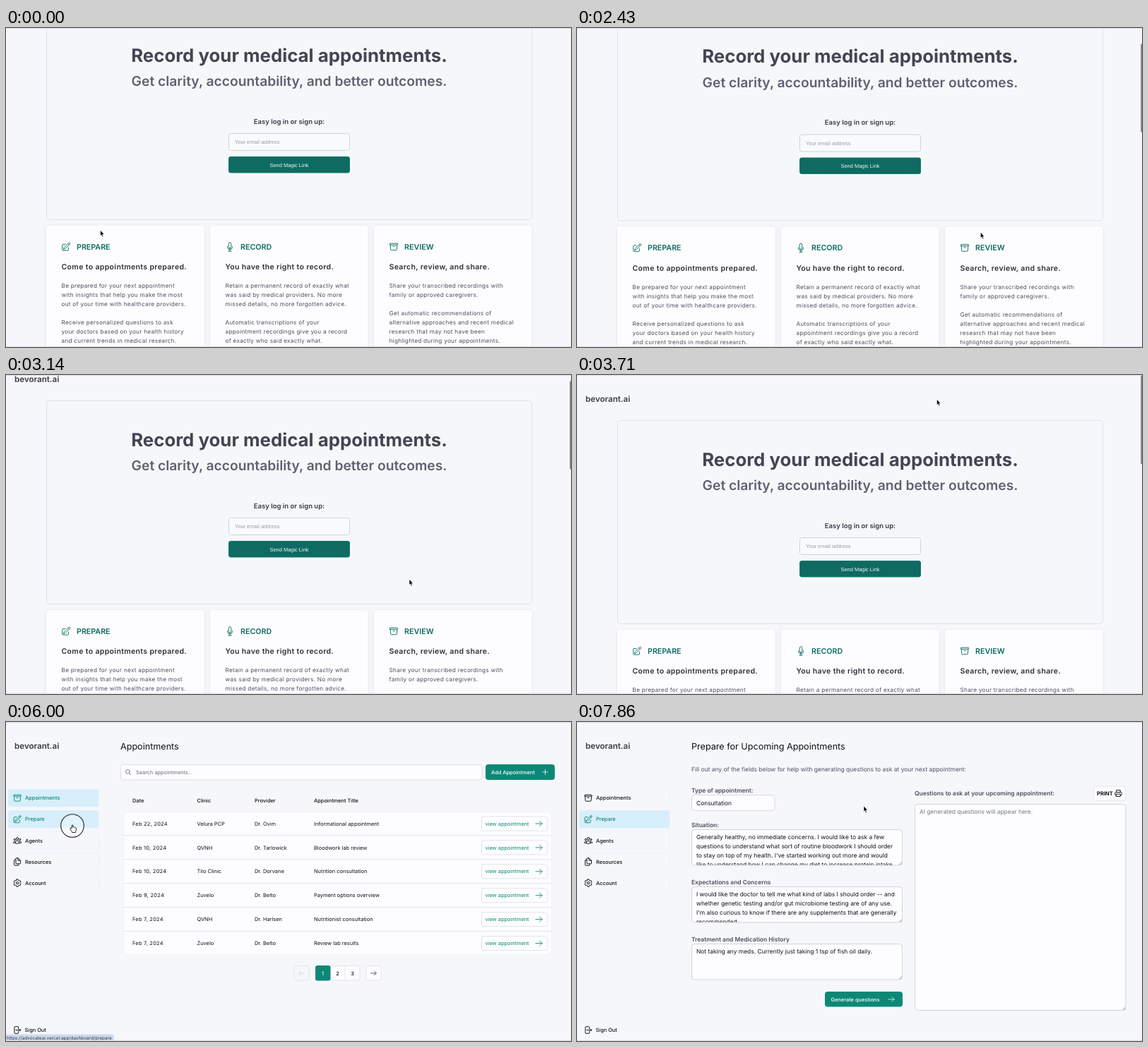
Write an HTML page that moves like this. It is 800 px wide and 452 px high and loops after 8000 ms.

```html
<!DOCTYPE html>
<html lang="en">
<head>
<meta charset="utf-8">
<title>Appointments demo</title>
<style>
  html, body { margin: 0; width: 100%; height: 100%; overflow: hidden; background: #f6f7fb; }
  svg { display: block; }
  text { font-family: Inter, "Open Sans", sans-serif; white-space: pre; text-rendering: geometricPrecision; }
  .arial { font-family: "Liberation Sans", Arial, sans-serif; }
  .icon { fill: none; stroke-linecap: round; stroke-linejoin: round; }
  .card { filter: drop-shadow(0 1px 2px rgba(40, 50, 80, .1)); }
</style>
</head>
<body>
<svg id="stage" width="100%" height="100%" viewBox="0 0 800 452"></svg>
<script>
const LOOP = 8000, STEP = 1000 / 7;
const INK = '#0f1115', SLATE = '#4a505e', GRAY = '#737986', TEAL = '#0d8877', DEEP = '#0f6a62', LINE = '#dfe2ea', WHITE = '#fdfdff';
const BRAND = 'bevorant.ai';

const ICONS = {
  pencil: 'M16.9 4.5l1.6-1.7a1.9 1.9 0 0 1 2.7 2.7L10.6 16.1a4.5 4.5 0 0 1-1.9 1.1L6 18l.8-2.7a4.5 4.5 0 0 1 1.1-1.9zM16.9 4.5l2.6 2.6M18 14v4.8A2.2 2.2 0 0 1 15.8 21H5.2A2.2 2.2 0 0 1 3 18.8V8.2A2.2 2.2 0 0 1 5.2 6H10',
  mic: 'M12 18.8a6 6 0 0 0 6-6v-1.5M12 18.8a6 6 0 0 1-6-6v-1.5M12 18.8v3.7M8.2 22.5h7.6M12 15.8a3 3 0 0 1-3-3V4.5a3 3 0 0 1 6 0v8.3a3 3 0 0 1-3 3z',
  archive: 'M20.3 7.5l-.7 10.6a2.2 2.2 0 0 1-2.2 2.2H6.6a2.2 2.2 0 0 1-2.2-2.2L3.8 7.5M10 11.3h4M3.4 7.5h17.2c.6 0 1.1-.5 1.1-1.1V4.9c0-.6-.5-1.1-1.1-1.1H3.4c-.6 0-1.1.5-1.1 1.1v1.5c0 .6.5 1.1 1.1 1.1z',
  people: 'M15 7a3 3 0 1 1-6 0a3 3 0 1 1 6 0M21 9.5a2.2 2.2 0 1 1-4.4 0a2.2 2.2 0 1 1 4.4 0M7.4 9.5a2.2 2.2 0 1 1-4.4 0a2.2 2.2 0 1 1 4.4 0M6 18.7a6 6 0 0 1 12 0a12 12 0 0 1-12 0zM18 18.7c1.7.2 3.2-.1 4.6-.7a4 4 0 0 0-5.6-3.6M6 18.7c-1.7.2-3.2-.1-4.6-.7a4 4 0 0 1 5.6-3.6',
  pages: 'M15.8 17.3v3.3c0 .6-.5 1.1-1.1 1.1H5c-.6 0-1.1-.5-1.1-1.1V7.9c0-.6.5-1.1 1.1-1.1h3.2M8.2 3.4c0-.6.5-1.1 1.1-1.1h4.5l6.5 6.5v7.4c0 .6-.5 1.1-1.1 1.1H9.3c-.6 0-1.1-.5-1.1-1.1zM13.8 2.3v6.5h6.5',
  cog: 'M10 2.5h4l.6 2.8 2 1.1 2.7-.9 2 3.5-2.1 1.9v2.2l2.1 1.9-2 3.5-2.7-.9-2 1.1-.6 2.8h-4l-.6-2.8-2-1.1-2.7.9-2-3.5 2.1-1.9v-2.2L2.7 9l2-3.5 2.7.9 2-1.1zM15 12a3 3 0 1 1-6 0a3 3 0 1 1 6 0',
  exit: 'M15.8 9V5.2A2.2 2.2 0 0 0 13.5 3h-6a2.2 2.2 0 0 0-2.2 2.2v13.6A2.2 2.2 0 0 0 7.5 21h6a2.2 2.2 0 0 0 2.3-2.2V15M18.8 15l3-3-3-3M21.8 12H9',
  search: 'M21 21l-5.2-5.2M17.5 10.5a7 7 0 1 1-14 0a7 7 0 1 1 14 0',
  right: 'M3 12h18M14 5l7 7-7 7',
  left: 'M21 12H3M10 5l-7 7 7 7',
  plus: 'M12 4v16M4 12h16',
  printer: 'M6.5 9V3h11v6M6.5 17.5H4.5a2 2 0 0 1-2-2V11a2 2 0 0 1 2-2h15a2 2 0 0 1 2 2v4.5a2 2 0 0 1-2 2h-2M6.5 14h11v7h-11z'
};

// Text is placed by the vertical centre of its capitals.
const text = (x, y, str, size, fill = INK, weight = 400, extra = '') =>
  `<text x="${x}" y="${(y + size * .36).toFixed(2)}" font-size="${size}" fill="${fill}" font-weight="${weight}" ${extra}>${str}</text>`;

// Borders lie inside the given edges.
function box(x1, y1, x2, y2, fill, stroke = 'none', r = 3, extra = '') {
  const inset = stroke === 'none' ? 0 : .5;
  return `<rect x="${x1 + inset}" y="${y1 + inset}" width="${x2 - x1 - 2 * inset}" height="${y2 - y1 - 2 * inset}" rx="${r}" fill="${fill}" stroke="${stroke}" ${extra}/>`;
}
const line = (x1, y1, x2, y2, stroke = LINE, width = 1) =>
  `<path d="M${x1} ${y1}L${x2} ${y2}" stroke="${stroke}" stroke-width="${width}"/>`;
const icon = (name, cx, cy, size, color = INK, width = 1.6) =>
  `<path class="icon" d="${ICONS[name]}" stroke="${color}" stroke-width="${width}" transform="translate(${cx - size / 2} ${cy - size / 2}) scale(${size / 24})"/>`;
const group = (id, body) => `<g id="${id}">${body}</g>`;
const MIDDLE = 'text-anchor="middle"';
const logo = () => text(12, 34, BRAND, 11.6, '#363b47', 600);

function home() {
  const cards = [
    ['pencil', 'PREPARE', 'Come to appointments prepared.',
      ['Be prepared for your next appointment', 'with insights that help you make the most', 'out of your time with healthcare providers.', '',
       'Receive personalized questions to ask', 'your doctors based on your health history', 'and current trends in medical research.']],
    ['mic', 'RECORD', 'You have the right to record.',
      ['Retain a permanent record of exactly what', 'was said by medical providers. No more', 'missed details, no more forgotten advice.', '',
       'Automatic transcriptions of your', 'appointment recordings give you a record', 'of exactly who said exactly what.']],
    ['archive', 'REVIEW', 'Search, review, and share.',
      ['Share your transcribed recordings with', 'family or approved caregivers.', '', 'Get automatic recommendations of',
       'alternative approaches and recent medical', 'research that may not have been', 'highlighted during your appointments.']]
  ];
  const card = ([glyph, tag, head, lines], i) => {
    const x = 57 + 232 * i, left = x + 21.5;
    return box(x, 361, x + 223.5, 580, WHITE, 'none', 4, 'class="card"') +
      icon(glyph, left + 6.5, 391, 14, DEEP) +
      text(left + 21.5, 391, tag, 10.7, DEEP, 600) +
      text(left, 419.5, head, 10.5, '#2b2f38', 600, 'letter-spacing=".35"') +
      lines.map((s, k) => text(left, 446.5 + 13 * k, s, 8.2, SLATE, 400, 'letter-spacing=".28"')).join('');
  };
  return logo() +
    box(57, 64, 745, 353, 'none', LINE, 4) +
    text(401, 119.5, 'Record your medical appointments.', 25.8, '#424653', 700, MIDDLE) +
    text(401, 156.5, 'Get clarity, accountability, and better outcomes.', 19.25, '#5d6270', 600, MIDDLE) +
    text(401, 213.5, 'Easy log in or sign up:', 9.5, '#363b47', 600, MIDDLE) +
    box(315, 230, 487, 255, '#f9fafd', '#d0d3da') +
    text(324, 242.5, 'Your email address', 7.45, '#989da8', 400, 'class="arial"') +
    box(315, 263, 487, 286.5, DEEP, '#12776d', 2.5) +
    text(401, 275, 'Send Magic Link', 7.45, '#eef7f6', 400, `class="arial" ${MIDDLE}`) +
    cards.map(card).join('');
}

function sidebar(active) {
  const items = [['archive', 'Appointments'], ['pencil', 'Prepare'], ['people', 'Agents'], ['pages', 'Resources'], ['cog', 'Account']];
  return logo() + line(131.5, 10, 131.5, 240, '#f1f3f8') +
    items.map(([glyph, label], i) => {
      const y = 107.7 + 30.1 * i, on = i === active, color = on ? TEAL : INK;
      return box(3, y - 12.5, 131, y + 12.5, on ? '#d7eefb' : 'none', on ? 'none' : '#f2f4f9') +
        icon(glyph, 16, y, 13, color, 1.8) + text(27, y, label, 7.4, color, 500);
    }).join('') +
    icon('exit', 15.5, 436.5, 13, INK, 1.8) + text(26.5, 436.5, 'Sign Out', 7.4, INK, 500);
}

function appointments() {
  const rows = [
    ['Feb 22, 2024', 'Velura PCP', 'Dr. Ovim', 'Informational appointment'],
    ['Feb 10, 2024', 'QVNH', 'Dr. Tarlowick', 'Bloodwork lab review'],
    ['Feb 10, 2024', 'Tilo Clinic', 'Dr. Dorvane', 'Nutrition consultation'],
    ['Feb 9, 2024', 'Zuvelo', 'Dr. Belto', 'Payment options overview'],
    ['Feb 7, 2024', 'QVNH', 'Dr. Harlsen', 'Nutritionist consultation'],
    ['Feb 7, 2024', 'Zuvelo', 'Dr. Belto', 'Review lab results']
  ];
  const columns = [179, 270.5, 352, 436];
  const row = (cells, i) => {
    const y = 144 + 33.9 * i;
    return cells.map((s, k) => text(columns[k], y, s, 7.45, INK, 400, k ? '' : 'letter-spacing=".25"')).join('') +
      (i ? line(166, y - 17, 773, y - 17, '#e2e4ea') : '') +
      box(673, y - 10.5, 767, y + 10.5, WHITE, '#e2e4ea') +
      text(678.5, y, 'view appointment', 7.4, TEAL) + icon('right', 754.5, y, 12, TEAL, 1.8);
  };
  return text(162, 34.5, 'Appointments', 12.6, INK) +
    box(162, 60, 674.5, 82.5, WHITE, '#dcdfe7') + icon('search', 173, 71, 10, SLATE, 1.8) +
    text(184, 71.3, 'Search appointments...', 7.35, '#686e7b') +
    box(679, 60, 777, 82, TEAL, 'none', 4) + text(687, 71.3, 'Add Appointment', 7.4, '#fff', 500) + icon('plus', 763.5, 71, 11, '#fff') +
    ['Date', 'Clinic', 'Provider', 'Appointment Title'].map((s, k) => text(columns[k], 111.3, s, 7.4, INK, 500)).join('') +
    box(166, 127, 773, 330, WHITE, '#f0f2f6', 6) + rows.map(row).join('') +
    box(407.5, 345, 429.5, 366.5, 'none', '#e3e5ec') + icon('left', 418.5, 356, 10, '#c9ccd4') +
    box(438, 345, 501.5, 366.5, WHITE, '#e3e5ec') + line(480, 345.5, 480, 366, '#e3e5ec') + box(438, 345, 459.5, 366.5, TEAL) +
    [1, 2, 3].map(k => text(427.5 + 21 * k, 356, k, 7.4, k > 1 ? INK : '#fff', 500, MIDDLE)).join('') +
    box(509.5, 345, 531.5, 366.5, WHITE, '#e3e5ec') + icon('right', 520.5, 356, 10);
}

function textarea(x1, y1, x2, y2, lines, fill = INK) {
  const body = lines.map((s, k) => text(7, 11 + 13 * k, s, 8.42, fill)).join('');
  return box(x1, y1, x2, y2, WHITE, '#cfd3db', 4) +
    `<svg x="${x1}" y="${y1}" width="${x2 - x1}" height="${y2 - y1 - 1}">${body}</svg>` +
    line(x2 - 5, y2 - 1, x2 - 1, y2 - 5, '#777', .6) + line(x2 - 3, y2 - 1, x2 - 1, y2 - 3, '#777', .6);
}

function prepare() {
  const label = (x, y, s) => text(x, y, s, 8.46, SLATE, 600);
  return text(162, 34.5, 'Prepare for Upcoming Appointments', 12.6, INK) +
    text(162, 67, 'Fill out any of the fields below for help with generating questions to ask at your next appointment:', 8.46, SLATE) +
    label(162, 97, 'Type of appointment:') + box(162, 103, 280.5, 126, WHITE, '#d8dbe3', 4) + text(169, 114.5, 'Consultation', 8.42) +
    label(162, 145.5, 'Situation:') +
    textarea(162, 152, 461, 203.5, ['Generally healthy, no immediate concerns. I would like to ask a few',
      'questions to understand what sort of routine bloodwork I should order',
      "to stay on top of my health. I've started working out more and would",
      'like to understand how I can change my diet to increase protein intake']) +
    label(162, 226.5, 'Expectations and Concerns') +
    textarea(162, 233, 461, 284.5, ['I would like the doctor to tell me what kind of labs I should order -- and',
      'whether genetic testing and/or gut microbiome testing are of any use.',
      "I'm also curious to know if there are any supplements that are generally", 'recommended.']) +
    label(162, 307.5, 'Treatment and Medication History') +
    textarea(162, 314, 461, 365.5, ['Not taking any meds. Currently just taking 1 tsp of fish oil daily.']) +
    box(351, 382, 461, 403.5, TEAL, 'none', 4) + text(359.5, 393, 'Generate questions', 7.4, '#fff', 500) + icon('right', 445, 393, 11, '#fff') +
    label(478, 101, 'Questions to ask at your upcoming appointment:') +
    box(731, 90.5, 777.5, 112, WHITE, '#e4e6ec') + text(736, 101, 'PRINT', 7.6, INK, 700) + icon('printer', 766.5, 101, 12, INK, 1.9) +
    textarea(478, 116, 777.5, 409, ['AI generated questions will appear here.'], GRAY);
}

const stage = document.getElementById('stage');
stage.innerHTML = box(0, 0, 800, 452, '#f6f7fb', 'none', 0) +
  group('home', home()) +
  group('list', sidebar(0) + appointments()) +
  group('hover', box(3, 125.3, 131, 150.3, '#d7eefb') + icon('pencil', 16, 137.8, 13, TEAL, 1.8) + text(27, 137.8, 'Prepare', 7.4, TEAL, 500)) +
  group('form', sidebar(1) + prepare()) +
  group('scrollbar', box(798.3, 1, 800.5, 126, '#77787c', 'none', 1)) +
  group('status', '<path d="M0 442.5H150q3 0 3 3V452H0z" fill="#cddaf0"/>' +
    text(1, 448, 'https://advocateai.vercel.app/dashboard/prepare', 6.4, '#30343c')) +
  line(0, .5, 800, .5, '#dcdde0') + line(0, 451.5, 800, 451.5, '#dcdde0') +
  group('ring', '<circle cx="-1" cy="-3.5" r="16.3" fill="#fff" fill-opacity=".25" stroke="#1c1f24" stroke-width="1.1"/>') +
  group('arrow', '<path d="M0 0V7.9L1.7 6.4 3 9.4 4.4 8.8 3.1 5.9H5.5z" fill="#000" stroke="#fff" stroke-width=".6"/>') +
  group('hand', '<path d="M-1.8 1V-2.8q0-1 .8-1t.8 1V-.6q1.700-.5 1.900.3 1.300-.3 1.500.5 1.200-.1 1.200 1V3q0 1.500-1 2.700V7H-1.500V6Q-3 4.500-4 2.200q-.5-1.500.7-1.500z" transform="translate(0 -1)" fill="#fff" stroke="#111" stroke-width=".9"/>');

const part = Object.fromEntries([...stage.querySelectorAll('g[id]')].map(g => [g.id, g]));
const show = (id, on) => part[id].setAttribute('visibility', on ? 'visible' : 'hidden');
const move = (id, x, y) => part[id].setAttribute('transform', `translate(${x} ${y})`);

// Keys are [step, ...values]; values between keys are interpolated.
function track(keys, n) {
  let i = 0;
  while (i < keys.length - 2 && keys[i + 1][0] <= n) i++;
  const [t0, ...a] = keys[i], [t1, ...b] = keys[i + 1];
  const k = Math.min(1, Math.max(0, (n - t0) / (t1 - t0)));
  return a.map((v, j) => v + (b[j] - v) * k);
}

const POINTER = [
  [0, 133.5, 286.5], [4, 142, 288], [8, 342, 289], [9, 352.5, 289.3], [10, 360, 289.5], [13, 592, 289.5], [14, 603, 289.5], [15, 571.5, 289.5],
  [22, 571, 289.5], [24, 558, 210], [26, 509.5, 34.5], [27, 496, -20], [33, 480, -20], [34, 450, 6], [38, 190, 112], [40, 104, 146],
  [42, 95, 150.5], [44, 95, 150.5], [46, 122, 148], [48, 190, 146], [51, 305, 122], [54, 395, 104], [55, 406, 119]
];
const SCROLL = [[16, 81], [18, 78], [20, 66.5], [22, 28], [24, 4], [25, 0]];
const FADE = [[27, .95], [29, 0]];

function draw(ms) {
  const n = Math.floor((ms % LOOP + 5) / STEP) % 56;
  const [x, y] = track(POINTER, n), [scroll] = track(SCROLL, n);
  const pointing = n >= 40 && n <= 46;
  show('home', n < 31);
  show('list', n >= 31 && n < 44);
  show('hover', n >= 40 && n < 44);
  show('form', n >= 44);
  show('status', n >= 41 && n < 48);
  show('ring', n === 42 || n === 43);
  show('hand', pointing);
  show('arrow', !pointing);
  show('scrollbar', n >= 17 && n < 29);
  part.scrollbar.setAttribute('opacity', track(FADE, n)[0]);
  move('home', 0, -scroll);
  move('scrollbar', 0, scroll * .27);
  for (const id of ['ring', 'hand', 'arrow']) move(id, x, y);
}

const start = performance.now();
function tick() {
  draw(performance.now() - start);
  requestAnimationFrame(tick);
}
tick();
</script>
</body>
</html>
```
